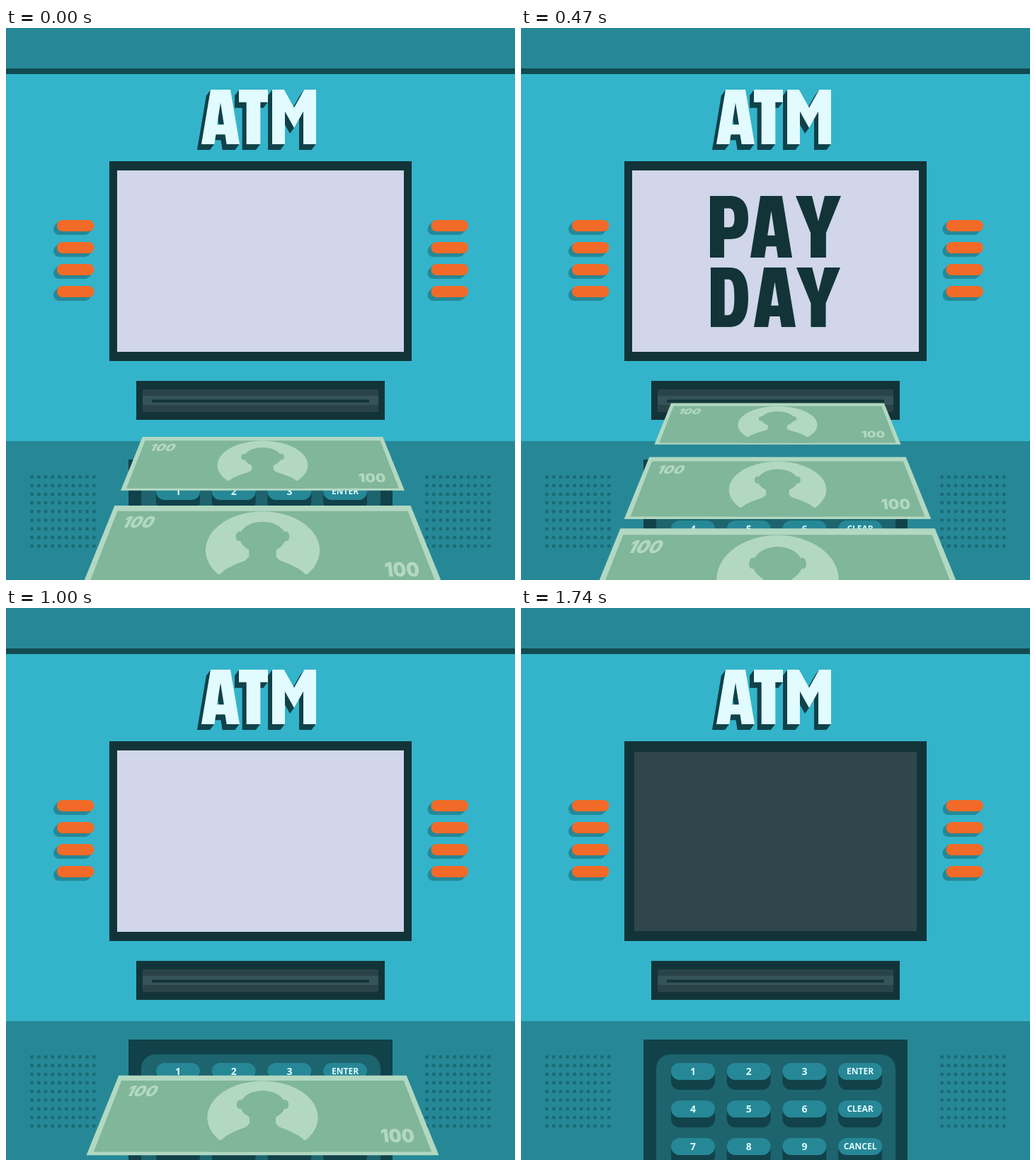
An HTML page with a canvas that plays this animation: 719x779 px, repeating every 2410 ms.

```html
<!DOCTYPE html>
<html lang="en">
<head>
<meta charset="utf-8">
<title>Payday cash machine</title>
<style>
html, body { margin: 0; width: 100%; height: 100%; overflow: hidden; background: #33b4cb; }
canvas { display: block; }
</style>
</head>
<body>
<canvas id="stage" width="719" height="779" role="img" aria-label="ATM: PAY DAY"></canvas>
<script>
const W = 719, H = 779, LOOP = 2410, LAST = 26;
const ctx = document.getElementById('stage').getContext('2d');
const C = {
  wall: '#33b4cb', band: '#268896', line: '#124a52', ink: '#123438',
  pad: '#11424a', panel: '#1d646e', dot: '#1b6a76', white: '#e1fbff',
  orange: '#f26a28', screen: '#d1d6ea', off: '#2f474c',
  bill: '#b2d8c2', green: '#80b699'
};
const SCREEN = { x: 157, y: 201, w: 405, h: 256 };

// Block letters in a 100 x 100 box
const GLYPH = {
  A: 'M24 0H76L100 100H66L62 82H38L34 100H0ZM50 24L41 64H59Z',
  T: 'M0 0H100V23H74V100H26V23H0Z',
  M: 'M0 0H27L50 33L73 0H100V100H71V40L50 70L29 40V100H0Z',
  P: 'M0 0H52C84 0 100 12 100 36C100 60 84 70 52 70H37V100H0ZM37 20H50C60 20 64 26 64 36C64 46 60 51 50 51H37Z',
  D: 'M0 0H50C86 0 100 18 100 50C100 82 86 100 50 100H0ZM37 20H46C58 20 63 28 63 50C63 72 58 80 46 80H37Z',
  Y: 'M0 0H36L50 41L64 0H100L67 60V100H33V60Z'
};

function word(letters, y, h) {
  const path = new Path2D();
  for (const [ch, x, w] of letters)
    path.addPath(new Path2D(GLYPH[ch]), new DOMMatrix([w / 100, 0, 0, h / 100, x, y]));
  return path;
}

const sign = word([['A', 276, 54], ['T', 329, 41], ['M', 376, 62]], 87, 77);
const pay = word([['P', 267, 54], ['A', 324, 59], ['Y', 388, 64]], 237, 87);
const day = word([['D', 268, 53], ['A', 329, 59], ['Y', 389, 62]], 338, 84);

function rect(color, x, y, w, h) {
  ctx.fillStyle = color;
  ctx.fillRect(x, y, w, h);
}

function pill(color, x, y, w, h, r) {
  ctx.fillStyle = color;
  ctx.beginPath();
  ctx.roundRect(x, y, w, h, r);
  ctx.fill();
}

function drawSign() {
  ctx.fillStyle = C.pad;
  for (let i = 8; i > 0; i--) {
    ctx.save();
    ctx.translate(-0.75 * i, i);
    ctx.fill(sign, 'evenodd');
    ctx.restore();
  }
  ctx.fillStyle = C.white;
  ctx.fill(sign, 'evenodd');
}

function drawButtons() {
  for (const x of [72, 600.5])
    for (let i = 0; i < 4; i++) {
      const y = 271 + i * 31;
      for (let s = 5; s > 0; s--) pill(C.band, x - s, y + s, 52, 16, 8);
      pill(C.orange, x, y, 52.5, 16, 8);
    }
}

function drawDots() {
  ctx.fillStyle = C.dot;
  for (const x of [36.5, 594.5])
    for (let c = 0; c < 10; c++)
      for (let r = 0; r < 9; r++) {
        ctx.beginPath();
        ctx.arc(x + c * 9.75, 633.5 + r * 12.2, 2.5, 0, 7);
        ctx.fill();
      }
}

function drawKeypad() {
  rect(C.pad, 173, 609, 373, 170);
  pill(C.panel, 191, 630, 338, 200, 20);
  ctx.textAlign = 'center';
  const rows = [['1', '2', '3', 'ENTER'], ['4', '5', '6', 'CLEAR'], ['7', '8', '9', 'CANCEL']];
  rows.forEach((row, r) => row.forEach((label, c) => {
    const x = 212 + c * 78.7, y = 642 + r * 53;
    pill(C.pad, x, y + 3, 62, 35, 12);
    pill(C.band, x, y, 62, 24, 12);
    ctx.fillStyle = C.white;
    const size = label.length > 1 ? 12 : 14;
    ctx.font = `900 condensed ${size}px "Noto Sans", "Open Sans", sans-serif`;
    ctx.fillText(label, x + 31, y + 12 + size * 0.36);
  }));
}

function drawMachine() {
  rect(C.wall, 0, 0, W, H);
  rect(C.band, 0, 0, W, 57);
  rect(C.line, 0, 57, W, 8);
  rect(C.band, 0, 583, W, 196);
  drawSign();
  drawButtons();
  rect(C.ink, 146, 188, 427, 282);
  rect(C.ink, 184, 498, 351, 55);
  pill('#2a4349', 193, 510, 333, 32, 2);
  rect('#36535a', 193, 519, 333, 13);
  rect(C.ink, 206, 524.5, 307, 4);
  drawDots();
  drawKeypad();
}

const layer = () => {
  const c = document.createElement('canvas');
  c.width = SCREEN.w;
  c.height = SCREEN.h;
  return c.getContext('2d');
};
const message = layer(), torn = layer();
message.translate(-SCREEN.x, -SCREEN.y);
message.fillStyle = C.ink;
message.fill(pay, 'evenodd');
message.fill(day, 'evenodd');

function rand(n) {
  const v = Math.sin(n * 12.9898) * 43758.5453;
  return v - Math.floor(v) - 0.5;
}

// Rows slip sideways, then columns slip up, by a strength of 0 and more
function drawMessage(g, k) {
  const { x, y, w, h } = SCREEN;
  torn.clearRect(0, 0, w, h);
  for (let r = 0; r < h; r += 4) {
    const dx = g * (-2 + 4 * Math.sin(r * 0.09 + k) + 5 * rand(r + k));
    torn.drawImage(message.canvas, 0, r, w, 4, dx, r, w, 4);
  }
  for (let c = 0; c < w; c += 5) {
    const dy = g * (-15 + 4 * Math.sin(c * 0.07 + k) + 6 * rand(c * 3 + k));
    ctx.drawImage(torn.canvas, c, 0, 5, h, x + c, y + dy, 5, h);
  }
}

function drawDebris(g) {
  const base = 449;
  const shapes = [
    [236, 0, 246, 5, 264, 6, 274, 12, 290, 14, 312, 11, 328, 4, 338, 6, 358, 5, 359, 0],
    [437, 0, 438, 8, 448, 9, 450, 1],
    [460, 0, 463, 7, 472, 11, 486, 8, 510, 13, 530, 15, 553, 15, 553, 0]
  ];
  ctx.fillStyle = C.ink;
  for (const s of shapes) {
    ctx.beginPath();
    for (let i = 0; i < s.length; i += 2) ctx.lineTo(s[i], base - s[i + 1] * g);
    ctx.fill();
  }
}

function drawScreen(k) {
  const { x, y, w, h } = SCREEN;
  const fade = Math.min(1, Math.max(0, (k - 18) / 6));
  if (fade === 1) return rect(C.off, x + 3, y + 2, w - 6, h - 3);
  rect(C.screen, x, y, w, h);
  ctx.save();
  ctx.beginPath();
  ctx.rect(x, y, w, h);
  ctx.clip();
  if (k >= 5 && k < 12 || k >= 18) {
    if (fade) {
      drawMessage(fade * 2, k);
      if (k > 19) drawDebris(fade * 2);
    } else {
      ctx.drawImage(message.canvas, x, y);
    }
  }
  ctx.globalAlpha = fade;
  rect(C.off, x, y, w, h);
  ctx.restore();
}

// Notes lie on a plane with its horizon at EYE; u is the inverse distance below it
const EYE = 159, MID = 362.5, SPREAD = 0.406, DEPTH = 0.000367, STEP = 0.0001395;
const starts = [0.00409, 0.003676, 0.003216, 0.002804, 0.002392, 0.001942];

function drawBill(top) {
  const at = (a, b) => {
    const d = 1 / (top - DEPTH * b);
    return [MID + a * SPREAD * d, EYE + d];
  };
  const shape = (color, points) => {
    ctx.fillStyle = color;
    ctx.beginPath();
    for (const [a, b] of points) ctx.lineTo(...at(a, b));
    ctx.fill();
  };
  const box = (color, a, b0, b1) => shape(color, [[-a, b0], [a, b0], [a, b1], [-a, b1]]);
  const oval = (color, a, b, ra, rb) => shape(color, Array.from({ length: 60 }, (_, i) => {
    const t = i * Math.PI / 30;
    return [a + ra * Math.cos(t), b + rb * Math.sin(t)];
  }));
  const value = (a, b) => {
    const d = 1 / (top - DEPTH * b), dy = DEPTH * d * d / 105;
    ctx.save();
    ctx.transform(SPREAD * d / 200, 0, a * SPREAD * dy, dy, ...at(a, b));
    ctx.fillStyle = C.bill;
    ctx.textAlign = 'left';
    ctx.font = 'italic 900 21px Inter, sans-serif';
    ctx.fillText('100', 0, 0);
    ctx.restore();
  };

  box(C.bill, 1, 0, 1);
  box(C.green, 0.966, 0.08, 0.965);
  oval(C.bill, 0, 0.535, 0.345, 0.45);
  const side = [[0.27, 0.965], [0.25, 0.85], [0.215, 0.79], [0.16, 0.735], [0.1, 0.69], [0.08, 0.65], [0.085, 0.5]];
  const mirror = side.map(([a, b]) => [-a, b]).reverse();
  shape(C.green, [...side, ...mirror]);
  shape(C.green, [[-0.27, 0.84], [0.27, 0.84], [0.3, 0.965], [-0.3, 0.965]]);
  oval(C.green, 0, 0.415, 0.143, 0.19);
  for (const a of [-0.145, 0.145]) oval(C.green, a, 0.41, 0.022, 0.06);
  value(-0.9, 0.3);
  value(0.7, 0.86);
}

function draw(t) {
  // Fifteen pictures a second, started on whole hundredths
  const k = Math.min(LAST, Math.floor(Math.floor(t / 10) * 3 / 20));
  drawMachine();
  drawScreen(k);
  for (const u of starts) {
    const top = u - STEP * k;
    if (top < 0.00272 && top > 0.0016) drawBill(top);
  }
}

let begin;
function tick(now) {
  begin ??= now;
  draw((now - begin) % LOOP);
  requestAnimationFrame(tick);
}
draw(0);
requestAnimationFrame(tick);
</script>
</body>
</html>
```
